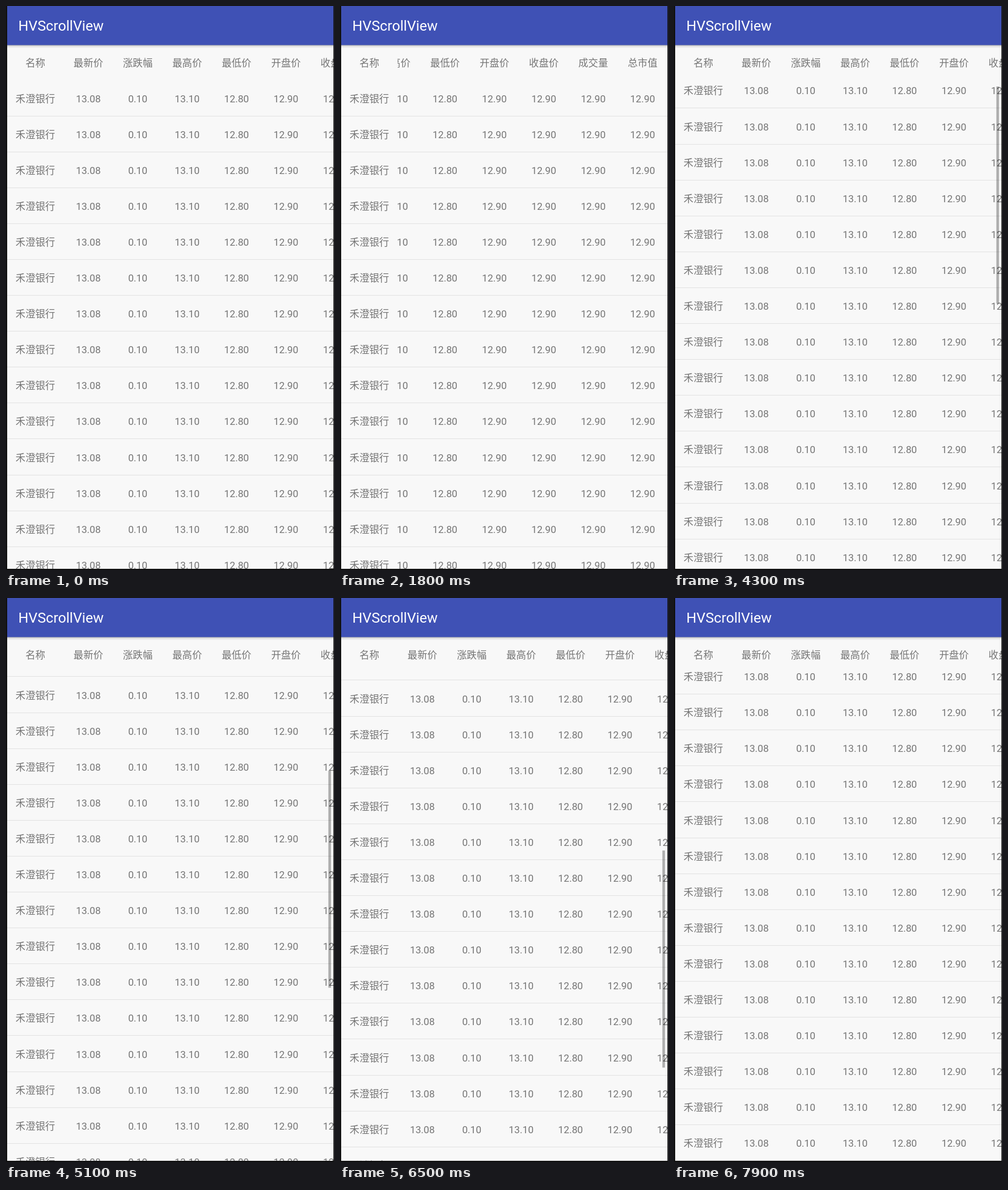
Animation of 559x960 px, one loop 8000 ms. Source, as an HTML page:

```html
<!DOCTYPE html>
<html lang="zh-CN">
<head>
<meta charset="utf-8">
<title>HVScrollView</title>
<style>
html, body { margin: 0; width: 100%; height: 100%; overflow: hidden; background: #111; }
svg { display: block; width: 100%; height: 100%; }
text { font: 16.84px Roboto, "Noto Sans CJK SC", "Noto Sans CJK", sans-serif; fill: #757575; text-anchor: middle; }
.title { font-size: 24.2px; fill: #fff; text-anchor: start; }
.line { fill: #e2e2e2; shape-rendering: crispEdges; }
</style>
</head>
<body>
<svg id="stage" viewBox="0 0 559 960" xmlns="http://www.w3.org/2000/svg">
  <defs>
    <linearGradient id="shade" x2="0" y2="1">
      <stop offset="0" stop-color="#000" stop-opacity=".34"/>
      <stop offset=".4" stop-color="#000" stop-opacity=".1"/>
      <stop offset="1" stop-color="#000" stop-opacity="0"/>
    </linearGradient>
    <clipPath id="list"><rect x="2" y="126" width="556" height="832"/></clipPath>
    <clipPath id="cols"><rect x="98" y="67" width="460" height="891"/></clipPath>
  </defs>
  <rect width="559" height="960" fill="#111"/>
  <rect x="2" width="556" height="958" fill="#f8f8f8"/>
  <g id="names" clip-path="url(#list)"></g>
  <g clip-path="url(#cols)">
    <g clip-path="url(#list)"><g id="values"></g></g>
    <g id="heads"></g>
  </g>
  <text x="50" y="103.4">名称</text>
  <rect id="bar" x="549.4" width="4.4" height="369.6"/>
  <rect x="2" y="66" width="556" height="6" fill="url(#shade)"/>
  <rect x="2" width="556" height="66.5" fill="#3f51b5"/>
  <text class="title" x="21" y="41.7">HVScrollView</text>
</svg>
<script>
const LOOP = 8000, STEP = 100;
const ROWS = 30, ROW_H = 61.1, COL_W = 84.2, TOP = 126, VIEW_H = 832;
const LIST_H = ROWS * ROW_H, MAX_X = 214, MAX_Y = 1001;
const HEADS = ["最新价", "涨跌幅", "最高价", "最低价", "开盘价", "收盘价", "成交量", "总市值"];
const VALUES = ["13.08", "0.10", "13.10", "12.80", "12.90", "12.90", "12.90", "12.90"];
const byId = id => document.getElementById(id);

function add(parent, tag, attrs, text = "") {
  const el = document.createElementNS("http://www.w3.org/2000/svg", tag);
  for (const key in attrs) el.setAttribute(key, attrs[key]);
  el.textContent = text;
  parent.append(el);
  return el;
}

const addCells = (parent, labels, y) =>
  labels.forEach((label, i) => add(parent, "text", { x: 140.35 + i * COL_W, y }, label));

addCells(byId("heads"), HEADS, 103.4);
const rows = Array.from({ length: ROWS }, () => {
  const name = add(byId("names"), "g", {});
  add(name, "rect", { class: "line", x: 2, y: 61, width: 556, height: 1 });
  add(name, "text", { x: 50, y: 37.7 }, "禾澄银行");
  const cells = add(byId("values"), "g", {});
  addCells(cells, VALUES, 37.7);
  return [name, cells];
});

const smooth = p => p * p * (3 - 2 * p);
const fling = p => 1 - (1 - p) ** 2;

// Gestures: start, end, target offset, easing
const swipesX = [[1300, 1800, MAX_X, smooth], [2500, 2900, 0, smooth]];
const swipesY = [
  [4196, 5100, 358.6, smooth],
  [5300, 6100, 95.6, smooth],
  [6100, 6800, 784.7, fling],
  [7100, 7500, MAX_Y, smooth]
];

function offsetAt(swipes, t) {
  let pos = 0;
  for (const [start, end, target, ease] of swipes) {
    if (t <= start) break;
    pos += (target - pos) * ease(Math.min(1, (t - start) / (end - start)));
  }
  return pos;
}

function barAlpha(t) {
  if (t < 4300) return 0;
  return 0.3 * Math.max(0, Math.min(1, (7900 - t) / 300));
}

function draw(t) {
  const x = offsetAt(swipesX, t), y = offsetAt(swipesY, t);
  const slide = `translate(${-x} 0)`;
  byId("heads").setAttribute("transform", slide);
  byId("values").setAttribute("transform", slide);
  rows.forEach((parts, i) => {
    const rowY = Math.floor(TOP + i * ROW_H - y + 0.05);
    for (const part of parts) part.setAttribute("transform", `translate(0 ${rowY})`);
  });
  const bar = byId("bar");
  bar.setAttribute("y", TOP + 5 + y * VIEW_H / LIST_H);
  bar.setAttribute("fill-opacity", barAlpha(t));
}

const began = performance.now();
let shown = -1;
function tick() {
  const elapsed = Math.max(0, performance.now() - began) % LOOP;
  const t = Math.floor(elapsed / STEP) * STEP;
  if (t !== shown) draw(shown = t);
  requestAnimationFrame(tick);
}
tick();
</script>
</body>
</html>
```
